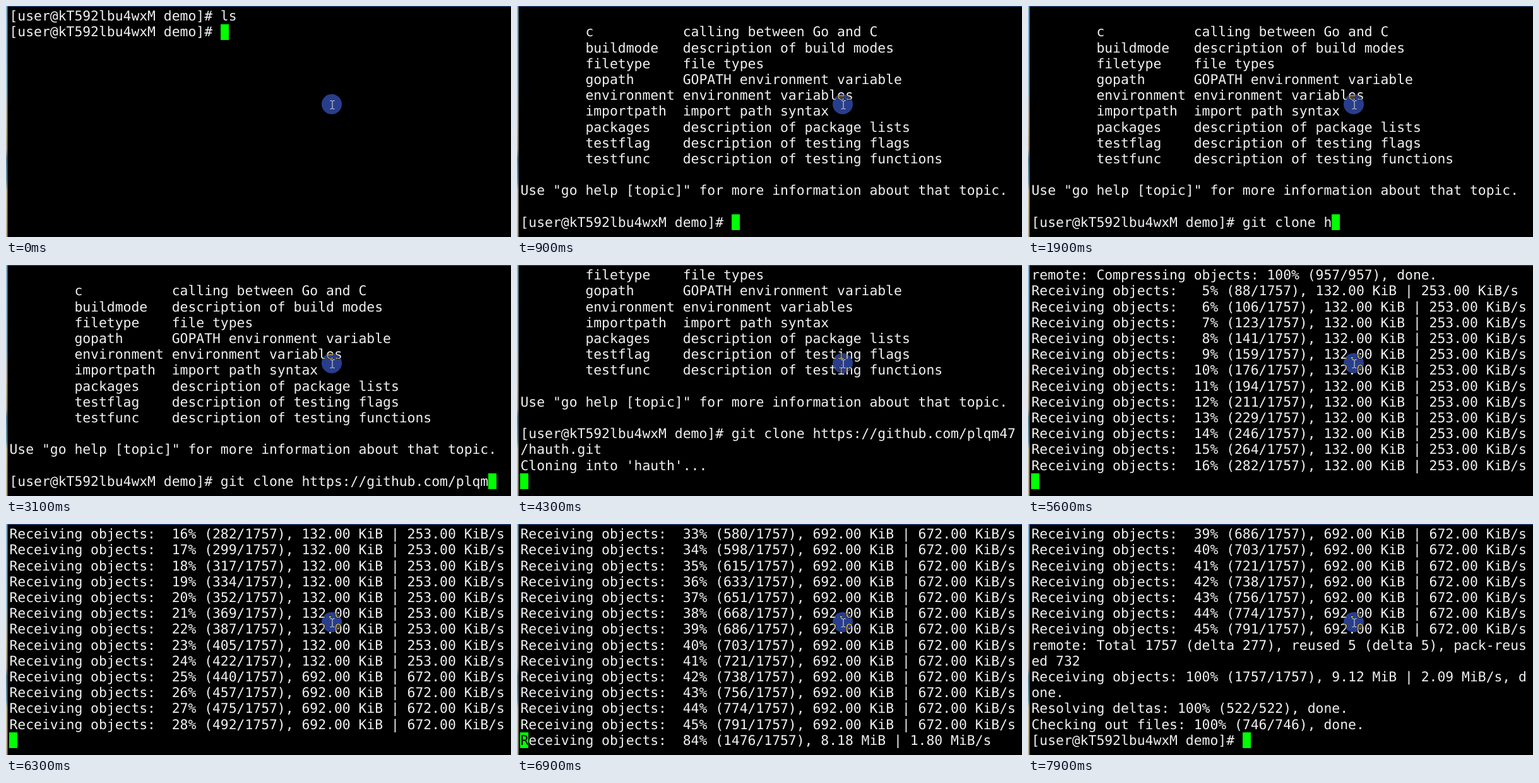
An HTML page for the animation above (8 s loop, 800 by 367 pixels).

```html
<!DOCTYPE html>
<html lang="en">
<head>
<meta charset="utf-8">
<title>Terminal session</title>
<style>
  html, body { margin: 0; width: 100%; height: 100%; overflow: hidden; background: #000; }
  svg { display: block; width: 800px; height: 367px; }
  text {
    font: 21.375px "DejaVu Sans Mono", monospace;
    fill: #f0f0f0;
    white-space: pre;
    text-rendering: geometricPrecision;
  }
  #under { fill: #000; }
  #halo { fill: #283e8c; mix-blend-mode: difference; }
</style>
</head>
<body>
<svg viewBox="0 0 800 367">
  <defs>
    <linearGradient id="edge" x1="0" y1="0" x2="0" y2="1">
      <stop offset="0" stop-color="#7fb0cc"/>
      <stop offset=".35" stop-color="#8fb4c6"/>
      <stop offset=".5" stop-color="#b8ab94"/>
      <stop offset=".62" stop-color="#a89e8c"/>
      <stop offset=".66" stop-color="#5b7d90"/>
      <stop offset=".76" stop-color="#6c93a8"/>
      <stop offset=".8" stop-color="#c0b294"/>
      <stop offset="1" stop-color="#b5a88e"/>
    </linearGradient>
  </defs>
  <rect width="800" height="367"/>
  <rect width="800" height="1" fill="#28508f"/>
  <rect width="2.4" height="367" fill="url(#edge)"/>
  <g id="rows"></g>
  <rect id="cursor" width="13" height="25" fill="#0f0"/>
  <text id="under"></text>
  <circle id="halo" cx="516" cy="156" r="16"/>
  <path d="M513.5 150.5h2.5l1 1 1-1h2.5M517 151v12M513.5 163.5h2.5l1-1 1 1h2.5" fill="none" stroke="#e4e2d4"/>
</svg>
<script>
const LOOP = 8000, STEP = 100;
const COLS = 61, ROWS = 14;
const LEFT = 5.5, TOP = 3.6, CHAR = 12.868, LINE = 25.2, ASCENT = 19.5;

const PROMPT = '[user@kT592lbu4wxM demo]# ';
const HELP = 'go help';
const CLONE = 'git clone https://github.com/plqm47/hauth.git';

const TOPICS = [
  ['c', 'calling between Go and C'],
  ['buildmode', 'description of build modes'],
  ['filetype', 'file types'],
  ['gopath', 'GOPATH environment variable'],
  ['environment', 'environment variables'],
  ['importpath', 'import path syntax'],
  ['packages', 'description of package lists'],
  ['testflag', 'description of testing flags'],
  ['testfunc', 'description of testing functions'],
].map(([name, about]) => ' '.repeat(8) + name.padEnd(12) + about);

// Characters typed after each step
const HELP_KEYS = [1, 2, 3, 4, 6, 7];
const CLONE_KEYS = [1, 2, 3, 4, 6, 8, 10, 11, 14, 15, 16, 18, 19, 21,
                    23, 24, 27, 29, 31, 33, 34, 35, 36, 38, 40, 42, 43, 45];

// [time, last percentage printed on its own line]
const RECEIVED = [[5500, 8], [5600, 16], [5700, 18], [5800, 20], [5900, 22], [6000, 24],
                  [6300, 28], [6400, 32], [6500, 36], [6600, 41], [6700, 45]];
// [time, percentage, size, rate] rewritten in place
const FAST = [[6800, 62, '4.36', '1.31'], [6900, 84, '8.18', '1.80'],
              [7000, 91, '8.61', '1.88'], [7100, 98, '8.97', '1.96']];

const latest = (list, t) => list.filter(item => t >= item[0]).pop();

function typed(text, keys, start, t) {
  const i = Math.floor((t - start) / STEP);
  return i < 0 ? '' : text.slice(0, keys[Math.min(i, keys.length - 1)]);
}

function wrap(text) {
  const parts = [];
  for (let i = 0; i < text.length; i += COLS) parts.push(text.slice(i, i + COLS));
  return parts;
}

function progress(label, percent, total) {
  const done = Math.ceil(percent * total / 100);
  return `${label}: ${String(percent).padStart(3)}% (${done}/${total})`;
}

const receiving = (percent, size, rate) =>
  `${progress('Receiving objects', percent, 1757)}, ${size} | ${rate}/s`;

function received(last) {
  const lines = [];
  for (let p = 5; p <= last; p++) {
    lines.push(p <= 24 ? receiving(p, '132.00 KiB', '253.00 KiB')
                       : receiving(p, '692.00 KiB', '672.00 KiB'));
  }
  return lines;
}

// Returns all printed lines and the cursor column on the last one
function session(t) {
  const lines = [PROMPT + 'ls'];
  const atPrompt = text => {
    lines.push(...wrap(PROMPT + text));
    const column = (PROMPT + text).length % COLS;
    if (column === 0) lines.push('');
    return { lines, column };
  };
  const atStart = text => {
    lines.push(text);
    return { lines, column: 0 };
  };

  if (t < 900) return atPrompt(typed(HELP, HELP_KEYS, 300, t));
  lines.push(PROMPT + HELP, '', ...TOPICS, '',
    'Use "go help [topic]" for more information about that topic.', '');

  if (t < 4200) return atPrompt(typed(CLONE, CLONE_KEYS, 1200, t));
  lines.push(...wrap(PROMPT + CLONE));
  if (t < 4300) return atStart('');
  lines.push("Cloning into 'hauth'...");
  if (t < 5200) return atStart('');

  lines.push('remote: Counting objects: 1757, done.');
  if (t < 5300) return atStart('');
  const compressing = percent => progress('remote: Compressing objects', percent, 957);
  if (t < 5400) return atStart(compressing(46));
  lines.push(compressing(100) + ', done.');
  if (t < 5500) return atStart('');

  lines.push(...received(latest(RECEIVED, t)[1]));
  if (t < 6800) return atStart('');
  if (t < 7200) {
    const [, percent, size, rate] = latest(FAST, t);
    return atStart(receiving(percent, size + ' MiB', rate + ' MiB'));
  }

  lines.push(
    ...wrap('remote: Total 1757 (delta 277), reused 5 (delta 5), pack-reused 732'),
    ...wrap(receiving(100, '9.12 MiB', '2.09 MiB') + ', done.'));
  const deltas = percent => progress('Resolving deltas', percent, 522);
  const files = percent => progress('Checking out files', percent, 746);
  if (t < 7600) return atStart(deltas(0));
  if (t < 7700) return atStart(deltas(68));
  lines.push(deltas(100) + ', done.');
  if (t < 7800) return atStart(files(31));
  if (t < 7900) return atStart(files(82));
  lines.push(files(100) + ', done.');
  return atPrompt('');
}

const cursor = document.getElementById('cursor');
const under = document.getElementById('under');
const rows = Array.from({ length: ROWS }, (_, i) => {
  const row = document.createElementNS('http://www.w3.org/2000/svg', 'text');
  row.setAttribute('x', LEFT);
  row.setAttribute('y', TOP + i * LINE + ASCENT);
  return document.getElementById('rows').appendChild(row);
});

function render(t) {
  const { lines, column } = session(t);
  const view = lines.slice(-ROWS);
  rows.forEach((row, i) => {
    const text = view[i] || '';
    if (row.textContent !== text) row.textContent = text;
  });
  const x = LEFT + column * CHAR;
  const y = TOP + (view.length - 1) * LINE;
  cursor.setAttribute('x', Math.floor(x));
  cursor.setAttribute('y', Math.round(y));
  under.setAttribute('x', x);
  under.setAttribute('y', y + ASCENT);
  under.textContent = view[view.length - 1][column] || '';
}

const start = performance.now();
function tick() {
  render((performance.now() - start) % LOOP);
  requestAnimationFrame(tick);
}
tick();
</script>
</body>
</html>
```
